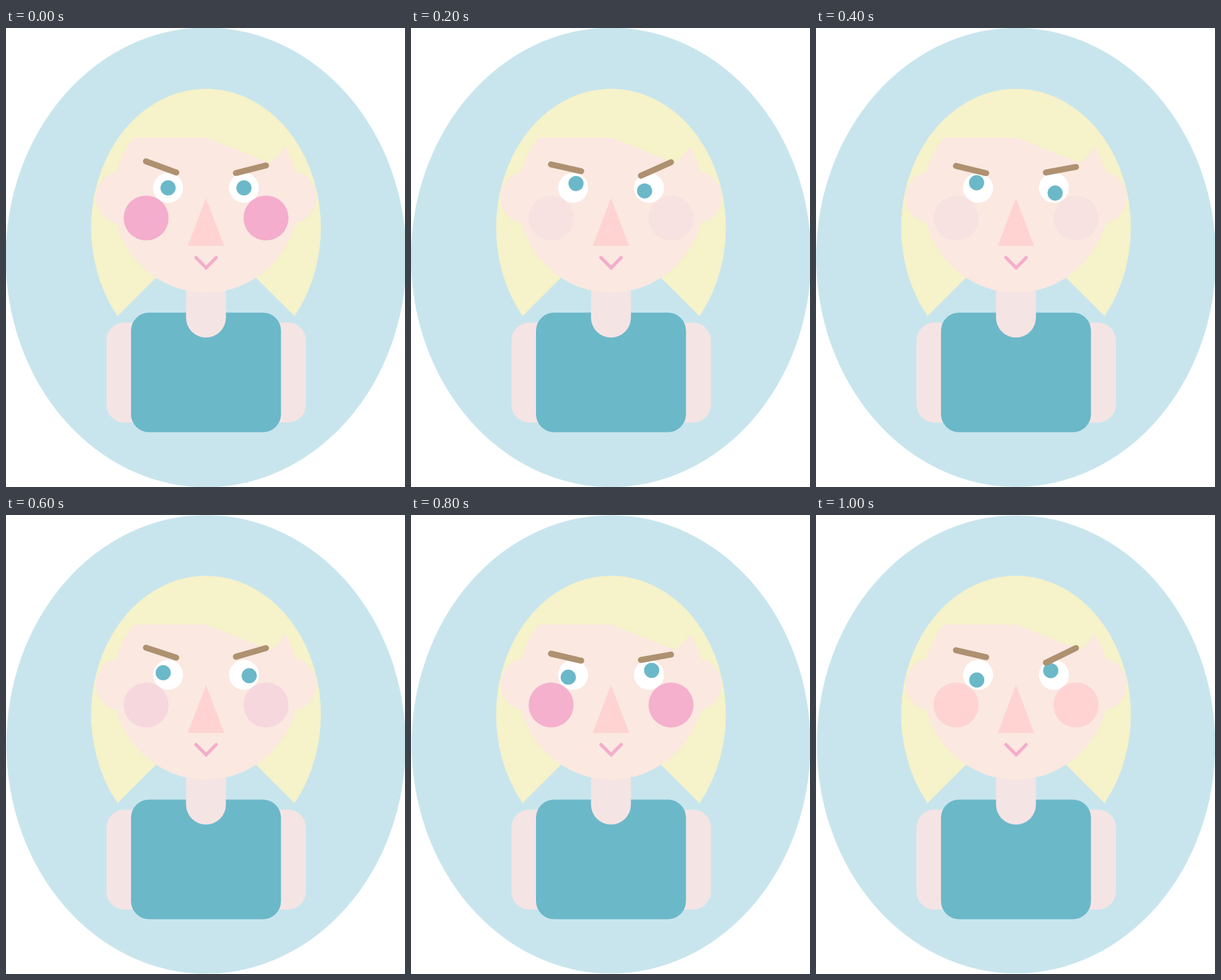
Recreate the animation shown at these times as an HTML page. Size 600 by 691 pixels, loop 1100 ms.

```html
<!DOCTYPE html>
<html lang="en">
<head>
<meta charset="utf-8">
<title>Shifty portrait</title>
<style>
  html, body { margin: 0; width: 100%; height: 100%; overflow: hidden; background: #fff; }
  svg { display: block; width: 600px; height: 691px; }
</style>
</head>
<body>
<svg viewBox="0 0 600 691">
  <ellipse id="backdrop" cx="300.8" cy="345.4" fill="#c8e5ed"/>
  <path d="M300.6 300.8L167.7 433.7A172.7 209 0 1 1 433.8 433.7Z" fill="#f6f2c9"/>
  <g fill="#f5e4e4">
    <rect x="151" y="443.5" width="300" height="150.5" rx="27"/>
    <rect x="188" y="428.5" width="225.5" height="180" rx="27" fill="#6bb8c9"/>
    <rect x="270.7" y="370" width="60" height="96" rx="30"/>
  </g>
  <g fill="#fae8e1">
    <ellipse cx="172" cy="255" rx="37" ry="39"/>
    <ellipse cx="430" cy="255" rx="37" ry="39"/>
    <path d="M192.3 165A140 143 0 1 0 409.3 165Z"/>
  </g>
  <path d="M301 165L396.5 203Q411 194 419 178L416 165Z" fill="#f6f2c9"/>
  <g fill="#fff">
    <circle cx="243.7" cy="240.7" r="22.6"/>
    <circle cx="357.8" cy="240.7" r="22.6"/>
  </g>
  <g id="cheeks">
    <circle cx="210.7" cy="286" r="33.8"/>
    <circle cx="391" cy="286" r="33.8"/>
  </g>
  <g fill="#6bb8c9">
    <circle id="pupilL" r="11.4"/>
    <circle id="pupilR" r="11.4"/>
  </g>
  <g stroke="#ae9170" stroke-width="9" stroke-linecap="round">
    <line id="browL" x1="210.5" x2="256"/>
    <line id="browR" x1="345.7" x2="391"/>
  </g>
  <path d="M300.7 256L328 328H273.4Z" fill="#fed3d2"/>
  <path d="M285.5 345.5L301 361L316.2 345.5" fill="none" stroke="#f4adcc" stroke-width="4.8" stroke-linecap="round"/>
</svg>
<script>
const LOOP = 1100, STEP = 100;
const PINK = [244, 173, 204], PALE = [247, 226, 225], SALMON = [254, 211, 210];
const blushKeys = [[0, PINK], [2, PALE], [5, PALE], [8.5, PINK], [9, PINK], [10, SALMON]];

const sin = deg => Math.sin(deg * Math.PI / 180);
const cos = deg => sin(deg + 90);

const set = (id, attrs) => {
  const el = document.getElementById(id);
  for (const name in attrs) el.setAttribute(name, attrs[name]);
};

// Pupils leave the centre of the eye, then circle around it.
function look(id, cx, angle, n) {
  const r = 8 * Math.min(1, n / 2);
  set(id, { cx: cx + r * cos(angle), cy: 240.7 + r * sin(angle) });
}

function blush(n) {
  const next = Math.max(1, blushKeys.findIndex(key => key[0] >= n));
  const [from, a] = blushKeys[next - 1], [to, b] = blushKeys[next];
  const k = (n - from) / (to - from), ease = k * k * (3 - 2 * k);
  return `rgb(${a.map((v, i) => Math.round(v + (b[i] - v) * ease))})`;
}

function draw(n) {
  set('backdrop', { rx: 301.3 - 0.18 * n, ry: 346 - 0.13 * n });
  look('pupilL', 243.7, 155 * n - 6, n);
  look('pupilR', 357.8, 213 - 34 * n, n);
  // Each end of a brow bobs at its own pace.
  set('browL', { y1: 204.6 + 5 * sin(68 * n - 128), y2: 216.8 + 3 * sin(95 * n + 15) });
  set('browR', { y1: 217.9 + 4.5 * sin(135 * n + 175), y2: 205.1 + 5 * sin(82 * n + 158) });
  set('cheeks', { fill: blush(n) });
}

const start = performance.now();
function tick() {
  draw(Math.floor((performance.now() - start) % LOOP / STEP));
  requestAnimationFrame(tick);
}
tick();
</script>
</body>
</html>
```
